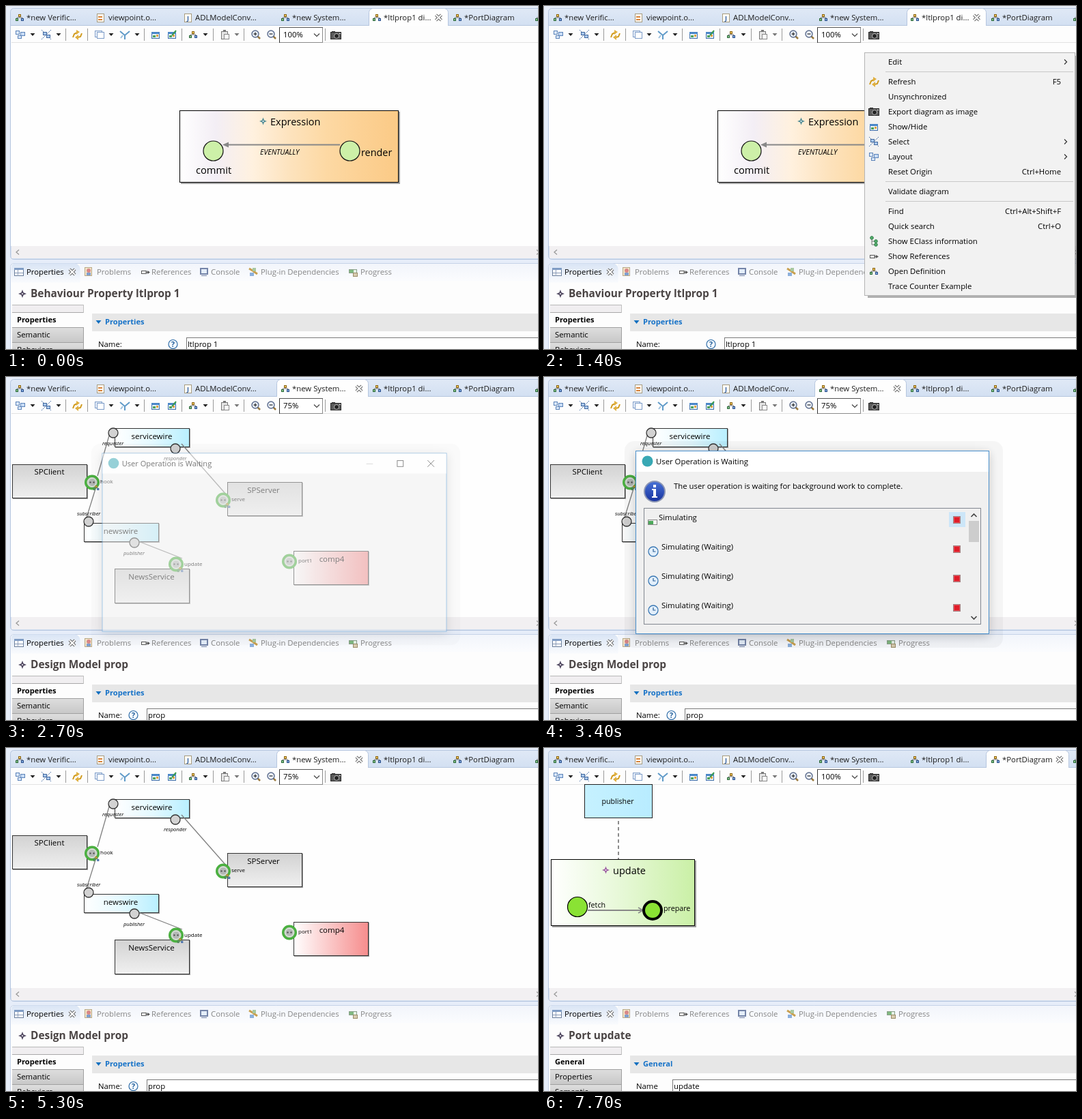
Write an HTML page with a canvas that moves like this. It is 779 px wide and 503 px high and loops after 8 s.

```html
<!DOCTYPE html>
<html lang="en">
<head>
<meta charset="utf-8">
<title>Model simulation</title>
<style>
html, body { margin: 0; width: 100%; height: 100%; overflow: hidden; background: #fff; }
canvas { display: block; width: 779px; height: 503px; }
</style>
</head>
<body>
<canvas id="stage" width="779" height="503"></canvas>
<script>
const W = 779, H = 503, LOOP = 8000;
const screen2d = document.getElementById('stage').getContext('2d');
const layer = document.createElement('canvas');
layer.width = W;
layer.height = H;
const layer2d = layer.getContext('2d');
let g = screen2d;

// ---- primitives ----
function txt(s, x, y, o = {}) {
  g.font = `${o.style || ''} ${o.size || 11.35}px "Open Sans", "Noto Sans", sans-serif`;
  g.fillStyle = o.color || '#000';
  g.textAlign = o.align || 'left';
  g.fillText(s, x, y);
}
function box(x, y, w, h, fill, stroke, lw = 1) {
  if (fill) { g.fillStyle = fill; g.fillRect(x, y, w, h); }
  if (stroke) {
    g.strokeStyle = stroke;
    g.lineWidth = lw;
    g.strokeRect(x + lw / 2, y + lw / 2, w - lw, h - lw);
  }
}
function line(pts, color, lw = 1) {
  g.beginPath();
  for (let i = 0; i < pts.length; i += 2) g.lineTo(pts[i], pts[i + 1]);
  g.strokeStyle = color;
  g.lineWidth = lw;
  g.stroke();
}
function poly(pts, fill) {
  g.beginPath();
  for (let i = 0; i < pts.length; i += 2) g.lineTo(pts[i], pts[i + 1]);
  g.fillStyle = fill;
  g.fill();
}
function disc(x, y, r, fill, stroke, lw = 1) {
  g.beginPath();
  g.arc(x, y, r, 0, 7);
  if (fill) { g.fillStyle = fill; g.fill(); }
  if (stroke) { g.strokeStyle = stroke; g.lineWidth = lw; g.stroke(); }
}
function rounded(x, y, w, h, r, fill, stroke) {
  g.beginPath();
  g.roundRect(x, y, w, h, r);
  g.fillStyle = fill;
  g.fill();
  if (stroke) { g.strokeStyle = stroke; g.lineWidth = 1; g.stroke(); }
}
function grad(x0, y0, x1, y1, ...colors) {
  const gr = g.createLinearGradient(x0, y0, x1, y1);
  colors.forEach((c, i) => gr.addColorStop(i / (colors.length - 1), c));
  return gr;
}
const hline = (x0, x1, y, c) => line([x0, y + .5, x1, y + .5], c);
const vline = (x, y0, y1, c) => line([x + .5, y0, x + .5, y1], c);

// ---- icons, placed by their centre ----
function star(x, y, r, color) {
  const k = r * .28;
  const pts = [x, y - r, x + k, y - k, x + r, y, x + k, y + k, x, y + r, x - k, y + k, x - r, y, x - k, y - k];
  poly(pts, color);
  disc(x, y, 1, '#fff');
}
function tree(x, y, s = 1) {
  line([x - 4 * s, y + 3 * s, x - 4 * s, y, x + 4 * s, y, x + 4 * s, y + 3 * s], '#777', s);
  line([x, y - 3 * s, x, y], '#777', s);
  box(x - 2 * s, y - 5 * s, 4 * s, 4 * s, '#f0c860', '#8a6414', s);
  box(x - 6 * s, y + s, 4 * s, 4 * s, '#8cc48c', '#2c6a3c', s);
  box(x + 2 * s, y + s, 4 * s, 4 * s, '#86aee0', '#2a4f8c', s);
}
function layoutIcon(x, y) {
  box(x - 7, y - 6, 6, 6, '#dce9fa', '#5a82b8');
  box(x, y - 4, 7, 6, '#c8dcf6', '#5a82b8');
  box(x - 4, y + 1, 6, 5, '#dce9fa', '#5a82b8');
}
function selectIcon(x, y) {
  g.setLineDash([2, 1]);
  line([x - 7, y - 7, x + 7, y + 7], '#4a72a8');
  line([x + 7, y - 7, x - 7, y + 7], '#4a72a8');
  g.setLineDash([]);
  box(x - 5, y - 4, 6, 5, '#a9c8ee', '#43699f');
  box(x, y, 6, 5, '#a9c8ee', '#43699f');
}
function refreshIcon(x, y) {
  line([x - 6, y + 4, x - 4, y - 1, x, y - 3], '#d09a1c', 2);
  poly([x - 1, y - 7, x + 4, y - 4, x - 1, y], '#e0b040');
  line([x + 7, y - 2, x + 5, y + 3, x + 1, y + 4], '#d09a1c', 2);
  poly([x + 2, y, x - 3, y + 4, x + 2, y + 8], '#e0b040');
}
function windowIcon(x, y, pin) {
  box(x - 6, y - 4, 12, 10, '#e6f2fc', '#3e6ea8');
  box(x - 6, y - 4, 12, 3, '#4a86c8');
  box(x - 4, y + 1, 4, 3, '#4ca05a');
  box(x + 1, y, 3, 3, '#e0a040');
  if (pin) line([x, y + 1, x + 6, y - 6], '#3a9a50', 2);
}
function camera(x, y) {
  box(x - 8, y - 5, 16, 11, '#5a5a5a', '#2a2a2a');
  box(x - 6, y - 6, 5, 2, '#333');
  disc(x + 1, y + 1, 3.5, '#222', '#bbb');
  box(x + 5, y - 3, 2, 1, '#eee');
}
function refIcon(x, y) {
  box(x - 6, y - 2, 8, 5, '#fff', '#555');
  line([x, y + .5, x + 5, y + .5], '#555');
  poly([x + 3, y - 2, x + 7, y + .5, x + 3, y + 3], '#555');
}
function branchIcon(x, y) {
  line([x - 3, y - 5, x - 3, y + 5, x + 3, y + 5], '#777');
  line([x - 3, y, x + 3, y], '#777');
  disc(x - 3, y - 5, 2.3, '#58b070', '#2a7a42');
  disc(x + 3, y, 2.3, '#58b070', '#2a7a42');
  disc(x + 3, y + 5, 2.3, '#58b070', '#2a7a42');
}
function page(x, y, mark, color) {
  box(x - 5, y - 6, 11, 13, '#fffdf6', '#a89c80');
  if (mark) txt(mark, x - 1, y + 4, { size: 9, style: 'bold', color });
  else { box(x - 3, y - 2, 6, 2, color); box(x - 3, y + 2, 6, 2, color); }
}
function closeX(x, y) {
  for (const [c, w] of [['#686868', 4], ['#fff', 2]]) {
    line([x - 4, y - 4, x + 4, y + 4], c, w);
    line([x + 4, y - 4, x - 4, y + 4], c, w);
  }
}
function zoomIcon(x, y, plus) {
  line([x + 3, y + 3, x + 7, y + 7], '#9a7a40', 2.5);
  disc(x, y, 5, '#eef5ff', '#5a6a8a', 1.4);
  line([x - 2.5, y, x + 2.5, y], '#222', 1.2);
  if (plus) line([x, y - 2.5, x, y + 2.5], '#222', 1.2);
}
const drop = (x, c = '#222') => poly([x - 3.5, 40, x + 3.5, 40, x, 44], c);

// ---- window frame ----
const EDGE = '#b6c6df';
const TABS = [
  [14, 30, '*new Verific...'], [133, 150, 'viewpoint.o...'], [261, 277, 'ADLModelConv...'],
  [403, 419, '*new System...'], [537, 553, '*ltlprop1 di...'], [655, 671, '*PortDiagram']
];
const ACTIVE = { 3: [396, 531, 517], 4: [531, 648, 633.5], 5: [647, 769, 755] };

function tabBar(active) {
  box(0, 0, W, H, '#e6edf9');
  rounded(6.5, 3.5, 800, 368, 5, grad(0, 3, 0, 28, '#e0e9f6', '#d3e0f2'), EDGE);
  const [x0, x1, cx] = ACTIVE[active];
  hline(7, W, 28, EDGE);
  rounded(x0 + .5, 3.5, x1 - x0 - 1, 27, [6, 6, 0, 0], '#fefefe', EDGE);
  TABS.forEach(([ix, tx, s], i) => {
    if (i === 1) page(ix + 5, 17, '', '#d8843c');
    else if (i === 2) page(ix + 5, 17, 'J', '#2f5fa8');
    else tree(ix + 6, 17);
    txt(s, tx, 21, { color: '#1c1c1c' });
  });
  tree(781, 17);
  closeX(cx, 17);
}
function toolbar(zoom) {
  box(7, 29, W, 25, '#fdfdfd');
  hline(8, W, 53, '#e2e2e2');
  layoutIcon(21, 42);
  selectIcon(59, 42);
  refreshIcon(104, 42);
  box(130, 36, 11, 10, '#eef4fc', '#7d9cc8');
  box(133, 38, 11, 10, '#fff', '#7d9cc8');
  line([167, 37, 174, 43, 181, 37], '#5f9ac8', 2);
  line([174, 43, 174, 49], '#5f9ac8', 2);
  line([168, 47, 171, 43], '#9cc0dc', 2);
  windowIcon(219, 42);
  windowIcon(243, 42, true);
  tree(274, 42);
  box(315, 37, 10, 12, '#e6e6e6', '#777');
  box(318, 35, 4, 3, '#777');
  box(319, 41, 8, 8, '#fff', '#888');
  for (const x of [39, 77, 154, 192, 292]) drop(x);
  drop(338, '#777');
  zoomIcon(365, 41, true);
  zoomIcon(388, 41, false);
  for (const x of [87, 119, 202, 257, 303, 348, 467]) vline(x, 33, 51, '#9a9a9a');
  box(400, 31, 64, 23, '#fff', '#8a8a8a');
  vline(400, 31, 54, '#333');
  hline(400, 464, 31, '#555');
  txt(zoom, 406, 46);
  line([451, 40.5, 455, 44.5, 459, 40.5], '#444', 1.2);
  camera(483, 43);
}
function canvasArea() {
  box(7, 54, W, 298, '#fefefe');
  box(8, 352, W, 18, '#f2f0f2');
  line([19, 357.5, 15, 361, 19, 364.5], '#9a9a9a', 1.3);
  line([777, 357.5, 781, 361, 777, 364.5], '#9a9a9a', 1.3);
}
function viewTabs() {
  const c = { color: '#868686' };
  rounded(6.5, 377.5, 800, 200, 5, '#fdfdfd', '#c6d3e8');
  box(108, 378, W, 25, grad(0, 378, 0, 403, '#f2f5fb', '#fbfcfe'));
  rounded(7.5, 377.5, 101, 28, [6, 8, 0, 0], grad(0, 378, 0, 404, '#dae5f5', '#f8fafd'));
  box(12, 384, 14, 12, '#fff', '#6b7f9c');
  box(12, 384, 14, 3, '#7f9cc4');
  line([17.5, 387, 17.5, 396], '#8a9cb8');
  hline(13, 25, 391, '#8a9cb8');
  txt('Properties', 30, 394);
  closeX(97, 390);
  box(115, 383, 11, 13, '#f4e6c8', '#b8a888');
  disc(121, 388, 3, '#d88888');
  box(118, 391, 6, 4, '#7fa0d0');
  txt('Problems', 133, 394, c);
  refIcon(204, 390);
  txt('References', 213, 394, c);
  box(284, 384, 12, 10, '#e4eefa', '#7484a8', 2);
  hline(286, 294, 395, '#7484a8');
  txt('Console', 300, 394, c);
  line([356, 385, 361, 388, 368, 393], '#c8a050', 3);
  box(357, 391, 6, 5, '#8cb0dc');
  box(361, 384, 5, 5, '#a8c8a0');
  txt('Plug-in Dependencies', 373, 394, c);
  box(502, 386, 12, 6, '#e6f0e6', '#8aa08a');
  box(503, 387, 6, 4, '#80b880');
  box(508, 391, 7, 6, '#d8ccb0', '#9a8c68');
  txt('Progress', 519, 394, c);
}

const PROPS = {
  expr: { title: 'Behaviour Property ltlprop 1', tabs: ['Properties', 'Semantic', 'Behaviors'], label: 'Name:', field: 264, value: 'ltlprop 1' },
  model: { title: 'Design Model prop', tabs: ['Properties', 'Semantic', 'Behaviors'], label: 'Name:', field: 206, value: 'prop' },
  port: { title: 'Port update', tabs: ['General', 'Properties', 'Semantic'], label: 'Name', field: 188, value: 'update' }
};
function properties(p) {
  const bold = { size: 11.1, style: 'bold' };
  star(24, 422, 6, '#524a62');
  txt(p.title, 36, 427, { size: 15.4, style: 'bold', color: '#4a4444' });
  box(9, 438, 105, 12, '#f0eef0');
  hline(9, 114, 438, '#b8b8b8');
  hline(9, 114, 449, '#a8a8a8');
  vline(113, 438, 450, '#c0c0c0');
  for (const y of [471, 493]) {
    box(9, y, 105, 22, grad(0, y, 0, y + 22, '#dedede', '#c8c8c8'));
    hline(9, 114, y, '#a0a0a0');
    vline(113, y, y + 22, '#a0a0a0');
  }
  txt(p.tabs[0], 16, 464, bold);
  txt(p.tabs[1], 16, 486);
  txt(p.tabs[2], 16, 508);
  box(126, 451, W, 26, '#e7e7e7');
  poly([131.5, 461, 139.5, 461, 135.5, 466], '#1470c0');
  txt(p.tabs[0], 145, 467, { ...bold, color: '#1672c8' });
  txt(p.label, 135, 500);
  box(p.field, 486, W, 40, '#fff', '#7a7a7a');
  txt(p.value, p.field + 2, 500);
  if (p.label.endsWith(':')) {
    disc(p.field - 19.5, 496, 6.5, '#f4f9ff', '#2f6da8', 1.2);
    txt('?', p.field - 19.5, 500, { size: 10.5, style: 'bold', align: 'center', color: '#1f5c98' });
  }
}

// ---- diagrams ----
function card(x, y, w, h, fill, { lw = 1, edge = '#333', drop = 1 } = {}) {
  box(x + drop, y + drop, w, h, '#a0a0a0');
  box(x, y, w, h, fill, edge, lw);
}
function exprDiagram() {
  const fill = grad(254, 0, 575, 0, '#fff', '#f3eef5', '#fff1df', '#fde3be', '#fdd9a4', '#fcd194', '#fbca86');
  card(254, 153, 321, 106, fill, { edge: '#000', drop: 2 });
  star(376.5, 169, 5.5, '#4f8a94');
  txt('Expression', 387, 175, { size: 14.5 });
  line([489, 203.5, 322, 203.5], '#888', 2);
  poly([317, 203.5, 326, 199.5, 326, 207.5], '#888');
  disc(303.5, 212.5, 14.5, '#cdf0a8', '#111', 1.2);
  disc(503.5, 212.5, 14.5, '#cdf0a8', '#111', 1.2);
  txt('commit', 278, 246, { size: 14.7 });
  txt('render', 520, 220, { size: 14.4 });
  txt('EVENTUALLY', 372, 218, { size: 10.6, style: 'italic' });
}
function port(x, y, linked, ring = '#4bb040') {
  disc(x, y, 9.3, '#c4c8c4', ring, 3.4);
  disc(x, y, 6, '#b4b8b6', '#e8f4e4');
  disc(x - 2.5, y, 1.2, '#555');
  disc(x + 2.5, y, 1.2, '#555');
  if (linked) tree(x + 6, y + 8, .7);
}
function systemDiagram(t) {
  const mid = { size: 11.5, align: 'center' };
  const wire = x => grad(x, 0, x + 110, 0, '#fff', '#e4f9ff', '#b8efff');
  const part = y => grad(0, y, 0, y + 50, '#d2d2d2', '#f0f0f0');
  const busy = t >= 3400 && t < 5300;
  card(159, 75, 110, 28, wire(159));
  card(9, 128, 110, 50, part(128));
  card(324, 154, 110, 50, part(154));
  card(114, 214, 110, 28, wire(114));
  card(159, 281, 110, 51, part(281), { lw: busy ? 3 : 1 });
  card(421, 255, 110, 50, grad(421, 0, 531, 0, '#fff', '#f68c8c'));
  txt('servicewire', 213.5, 91, mid);
  txt('SPClient', 63.5, 143, mid);
  txt('SPServer', 377, 170, mid);
  txt('newswire', 168, 230, mid);
  txt('NewsService', 213, 297, mid);
  txt('comp4', 477, 271, mid);
  line([151, 86, 134, 145], '#808080', 1.3);
  line([131, 164, 118, 206], '#808080', 1.3);
  line([257, 98, 323, 173], '#808080', 1.3);
  line([194, 241, 258, 266], '#808080', 1.3);
  for (const [x, y] of [[157, 82], [248, 105], [121, 212], [188, 243]]) disc(x, y, 7, '#d2d2d2', '#333', 1.3);
  port(126, 154.5, true);
  port(318, 180.5, true);
  port(249, 274.5, true, t >= 5800 ? '#2c7d26' : undefined);
  port(415, 270.5);
  const role = { size: 7.5, style: 'italic' }, name = { size: 8 };
  txt('requester', 141, 100, role);
  txt('responder', 231, 122, role);
  txt('subscriber', 104, 203, role);
  txt('publisher', 172, 261, role);
  txt('hook', 138, 156, name);
  txt('serve', 330, 182, name);
  txt('update', 261, 277, name);
  txt('port1', 428, 272, name);
}
function stateNode(x, y, on) {
  disc(x, y, on ? 13 : 14.5, '#8ae234', '#000', on ? 4 : 1.2);
}
function portDiagram(t) {
  const small = { size: 10.7 };
  box(59, 53, 100, 50, grad(59, 0, 159, 0, '#c6f1ff', '#b8ecff'), '#222');
  txt('publisher', 108, 82, { ...small, align: 'center' });
  g.setLineDash([5, 4]);
  line([109, 107, 109, 163], '#666', 1.5);
  g.setLineDash([]);
  card(10, 163, 211, 98, grad(10, 0, 221, 0, '#fff', '#e6f8d6', '#caf0a6'), { edge: '#000', drop: 2 });
  star(90.5, 179, 5.5, '#9a5aa0');
  txt('update', 101, 185, { size: 14.5 });
  line([64, 238, 143, 238], '#888', 2);
  line([138, 234, 145, 238, 138, 242], '#888', 1.5);
  stateNode(49, 233, t >= 6700 && t < 7200);
  stateNode(159, 238, t >= 7700);
  txt('fetch', 65, 234, small);
  txt('prepare', 175, 239, small);
}

// ---- pop-ups ----
const MENU = [
  [82, 'Edit', '>'], [111, 'Refresh', 'F5', refreshIcon], [133, 'Unsynchronized'],
  [155, 'Export diagram as image', '', camera], [177, 'Show/Hide', '', windowIcon],
  [199, 'Select', '>', selectIcon], [221, 'Layout', '>', layoutIcon], [243, 'Reset Origin', 'Ctrl+Home'],
  [272, 'Validate diagram'], [301, 'Find', 'Ctrl+Alt+Shift+F'], [323, 'Quick search', 'Ctrl+O'],
  [345, 'Show EClass information', '', branchIcon], [367, 'Show References', '', refIcon],
  [389, 'Open Definition', '', tree], [411, 'Trace Counter Example']
];
function menu() {
  box(474, 73, 308, 355, 'rgba(0,0,0,.3)');
  box(469, 68, 309, 357, '#f2f2f2', '#b4b4b4');
  for (const y of [96, 257, 286]) hline(500, 775, y, '#c8c8c8');
  for (const [y, s, key, icon] of MENU) {
    if (icon) icon(483, y);
    txt(s, 504, y + 4);
    if (key === '>') line([762, y - 3.5, 765.5, y, 762, y + 3.5], '#333', 1.2);
    else if (key) txt(key, 757, y + 4, { align: 'right' });
  }
}
function dialog(filled, buttons) {
  rounded(118, 94, 554, 303, 14, 'rgba(0,0,0,.035)');
  g.shadowColor = 'rgba(0,0,0,.2)';
  g.shadowBlur = 14;
  g.shadowOffsetY = 3;
  box(134, 108, 518, 269, '#f0f0f0');
  g.shadowColor = 'transparent';
  box(134, 108, 518, 269, null, '#4a90cc');
  box(135, 109, 516, 30, '#fff');
  disc(151.5, 123.5, 8, '#38a8b4');
  txt('User Operation is Waiting', 164, 128);
  if (buttons) {
    hline(531, 541, 124, '#bbb');
    box(577, 119, 10, 10, null, '#222');
    line([623, 119, 633, 129], '#222');
    line([633, 119, 623, 129], '#222');
  }
  if (!filled) return;
  disc(162, 168, 15, grad(0, 152, 0, 184, '#4a74d8', '#16309c'), '#8c96b4', 2);
  box(160, 158, 4, 4, '#fff');
  poly([158, 164, 164, 164, 164, 175, 166, 175, 166, 177, 158, 177, 158, 175, 160, 175, 160, 166, 158, 166], '#fff');
  txt('The user operation is waiting for background work to complete.', 190, 164);
  box(146, 192, 494, 171, null, '#828790');
  box(593, 198, 24, 22, '#cce6f8');
  for (let i = 0; i < 4; i++) {
    const y = 209 + 43 * i;
    if (i) {
      disc(160, y + 4, 7, '#e2effb', '#3a78b4', 1.3);
      line([160, y, 160, y + 4, 163.5, y + 4], '#2c5f96', 1.2);
      txt('Simulating (Waiting)', 172, y + 1);
    } else {
      box(152, 209, 14, 8, '#f4f4f4', '#888');
      box(153, 211, 7, 5, '#4ca85a');
      txt('Simulating', 168, 210);
    }
    box(599, y - 5, 11, 11, '#f4dcdc', '#a08080');
    box(601, y - 3, 7, 7, '#e01c28');
    box(600, y - 4, 9, 9, null, '#e8505a');
  }
  box(622, 211, 15, 31, '#cdcdcd');
  line([625.5, 205, 629.5, 201, 633.5, 205], '#444', 1.6);
  line([625.5, 351, 629.5, 355, 633.5, 351], '#444', 1.6);
}
function popup(draw, alpha, scale = 1) {
  if (!alpha) return;
  layer2d.clearRect(0, 0, W, H);
  g = layer2d;
  g.save();
  g.translate(393, 242);
  g.scale(scale, scale);
  g.translate(-393, -242);
  draw();
  g.restore();
  g = screen2d;
  g.globalAlpha = alpha;
  g.drawImage(layer, 0, 0);
  g.globalAlpha = 1;
}
// Values of the last [time, ...values] entry already reached
const at = (t, keys) => keys.filter(k => k[0] <= t).pop().slice(1);

const MENU_FADE = [[0, 0], [700, .25], [800, .55], [900, .8], [1000, 1], [1500, .6], [1600, .25], [1700, 0]];
const DIALOG_FADE = [[0, 0, 1], [2700, .52, .975], [2800, .88, .995], [2900, 1, 1], [3500, .4, .965], [3600, 0, 1]];

function render(t) {
  const [view, zoom] = at(t, [[0, 4, '100%'], [1600, 4, ''], [2000, 3, '75%'], [6200, 5, '100%']]);
  const [props] = at(t, [[0, 'expr'], [2300, 'model'], [6300, 'port']]);
  tabBar(view);
  toolbar(zoom);
  canvasArea();
  ({ 3: systemDiagram, 4: exprDiagram, 5: portDiagram })[view](t);
  viewTabs();
  properties(PROPS[props]);
  popup(menu, ...at(t, MENU_FADE));
  popup(() => dialog(t >= 2800, t < 3400), ...at(t, DIALOG_FADE));
}
function tick() {
  render(performance.now() % LOOP);
  requestAnimationFrame(tick);
}
tick();
</script>
</body>
</html>
```
